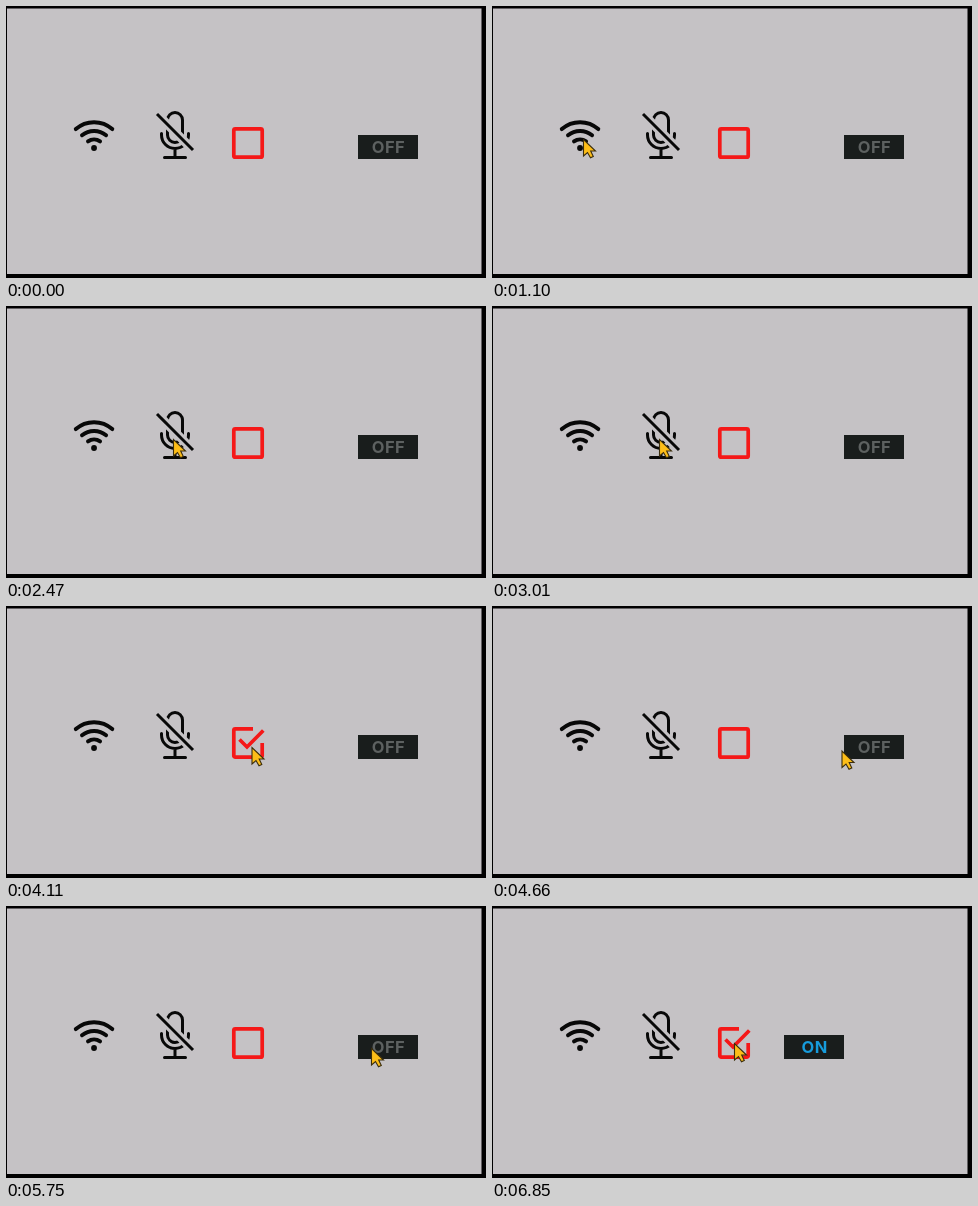
Recreate the animation shown at these times as an HTML page. Size 480 by 272 pixels, loop 7.12 s.

```html
<!DOCTYPE html>
<html lang="en">
<head>
<meta charset="utf-8">
<title>Icon toggles</title>
<style>
html, body { margin: 0; height: 100%; overflow: hidden; background: #000; }
svg { display: block; width: 480px; height: 272px; }
text { font: 700 16.5px Inter, Roboto, sans-serif; letter-spacing: .5px; text-anchor: middle; }
.line { fill: none; stroke-linecap: round; stroke-linejoin: round; }
</style>
</head>
<body>
<svg viewBox="0 0 480 272">
  <rect x="1" y="2.5" width="474.500" height="265.500" fill="#c5c2c5"/>

  <g id="wifi" class="line" transform="translate(67.4 107.6) scale(1.72)" stroke="#080808" stroke-width="2.3">
    <path d="M1.4 9a16 16 0 0 1 21.2 0M5 12.6a11 11 0 0 1 14 0M8.5 16.1a6 6 0 0 1 7 0"/>
    <circle cx="12" cy="20" r="1.7" fill="#080808" stroke="none"/>
  </g>
  <g id="wifiBlue" class="line" transform="translate(64 103) scale(3)" stroke="#79c7ea">
    <path d="M1 5.8A12 12 0 0 1 15 5.8M3.1 7.9A9 9 0 0 1 12.9 7.9M5.3 10.1A6 6 0 0 1 10.7 10.1"/>
    <path d="M6.7 12.1A2 2 0 0 1 9.3 12.1L8 13.3Z" fill="#79c7ea" stroke="none"/>
  </g>

  <g class="line" transform="translate(145 105) scale(3)" stroke="#080808">
    <path d="M5.5 3a2.5 2.5 0 0 1 5 0v5a2.5 2.5 0 0 1-5 0zM3.5 7.500v.5a4.5 4.5 0 0 0 9 0V7.500M8 12.5v3M4.5 15.5h7"/>
    <g id="slash" stroke-linecap="butt">
      <path d="M2 1L14 13" stroke="#c5c2c5" stroke-width="3"/>
      <path d="M2 1L14 13" style="stroke-linecap: butt"/>
    </g>
  </g>

  <g class="line" stroke="#f51818" stroke-width="3.7">
    <rect id="box" x="227.8" y="122.8" width="28.4" height="28.4" rx="1.5"/>
    <path id="checked" style="stroke-linecap: butt; stroke-linejoin: miter" d="M247 122.8H229.3a1.500 1.500 0 0 0-1.500 1.500V149.700a1.500 1.500 0 0 0 1.500 1.500H254.700a1.500 1.500 0 0 0 1.500-1.500V137M233.500 133.500L241 141L257.300 124.500"/>
  </g>

  <g id="off">
    <rect x="352" y="129" width="60" height="24" fill="#191d1c"/>
    <text x="382.5" y="147" fill="#5d6160">OFF</text>
  </g>
  <g id="on">
    <rect x="292" y="129" width="60" height="24" fill="#191d1c"/>
    <text x="322.7" y="147" fill="#169cdc">ON</text>
  </g>

  <path id="cursor" d="M0 0V16.5L4 13L7 18.3L9.8 17L7.2 11.5H12Z" fill="#fdbd18" stroke="#3b2d0c" stroke-width="1.1"/>
</svg>
<script>
const LOOP = 7120, STEPS = 26;
// Cursor stops: step, x, y
const stops = [
  [3, 82.5, 155.5], [4, 91.5, 133.5], [9, 167.5, 133.5], [12, 217, 140],
  [13, 246, 141.5], [16, 276, 141.5], [17, 350, 145], [18, 365.5, 142.5],
  [22, 334, 145], [23, 318, 140], [24, 242.5, 137.5]
];
const el = id => document.getElementById(id);
const show = (id, on) => el(id).style.display = on ? "" : "none";
const swap = (a, b, on) => { show(a, !on); show(b, on); };

function draw() {
  const t = performance.now() % LOOP;
  const step = Math.floor((t + 2.5) / LOOP * STEPS) % STEPS;
  const within = (a, b) => step >= a && step < b;

  swap("wifi", "wifiBlue", within(6, 8));
  show("slash", step !== 10);
  swap("box", "checked", within(14, 16) || step >= 24);
  swap("off", "on", within(18, 20) || step >= 22);

  const stop = stops.filter(s => s[0] <= step).pop();
  show("cursor", stop);
  if (stop) el("cursor").setAttribute("transform", `translate(${stop[1]} ${stop[2]})`);
  requestAnimationFrame(draw);
}
draw();
</script>
</body>
</html>
```
